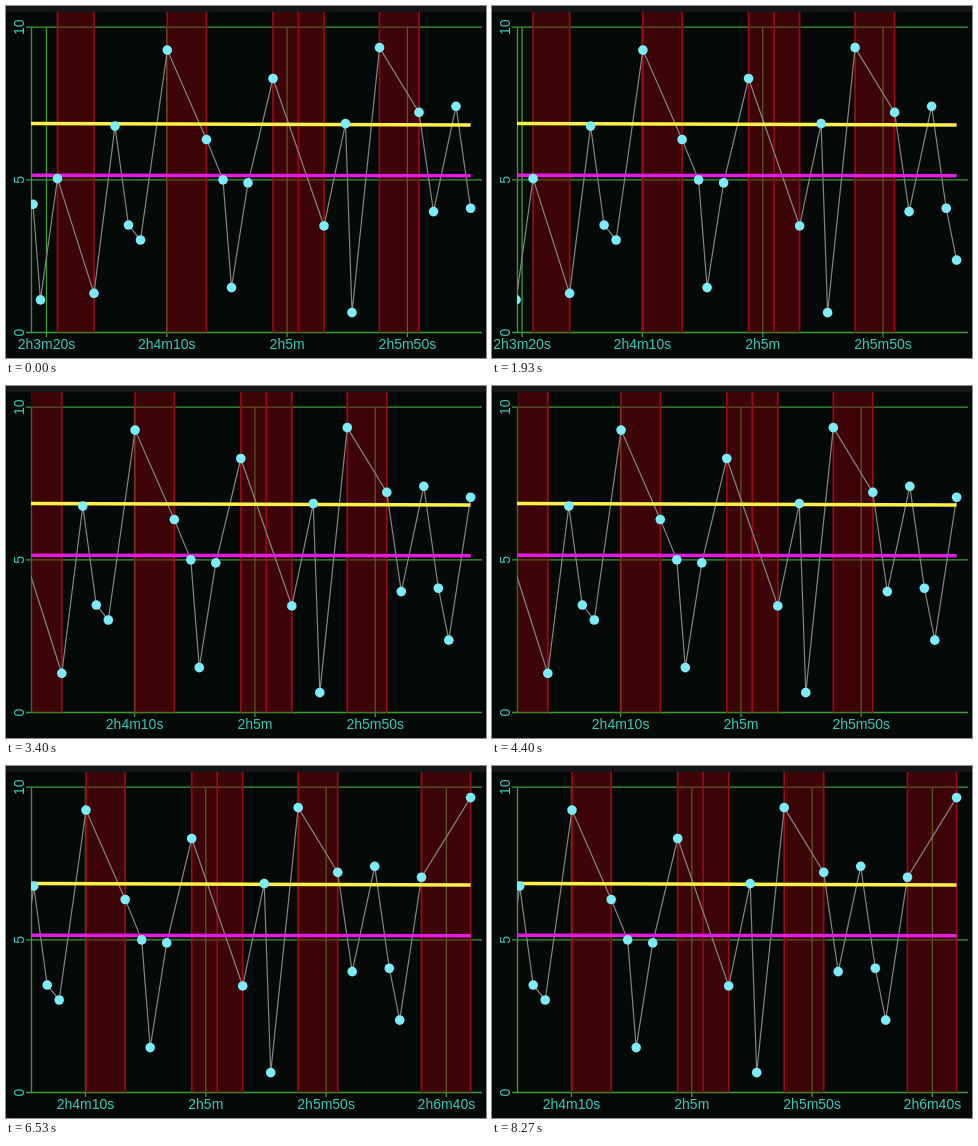
Animation, 480 px wide and 352 px high, one loop 8340 ms. Source, as an HTML page with a canvas:

```html
<!DOCTYPE html>
<html lang="en">
<head>
<meta charset="utf-8">
<title>Streaming plot</title>
<style>
html, body { margin: 0; width: 480px; height: 352px; overflow: hidden; background: #050a08; }
canvas { display: block; }
</style>
</head>
<body>
<canvas id="plot" width="480" height="352"></canvas>
<script>
const ctx = document.getElementById('plot').getContext('2d');
const LOOP = 8340, LEFT = 25, RIGHT = 464.6, TOP = 6, BASE = 326.5, UNIT = 30.53;
const TICK_GAP = 120.3, TICK_SECONDS = 50, FIRST_TICK = 7400;
const GRID = '#3c9c3a';

// Measured samples: position along the time axis, value from 0 to 10
const samples = [
  [27, 4.2], [34.5, 1.07], [51.5, 5.04], [88, 1.28], [109, 6.76], [122.5, 3.52],
  [134.5, 3.03], [161.3, 9.25], [200.5, 6.32], [217, 5], [225.5, 1.47], [242, 4.9],
  [267, 8.32], [318, 3.49], [339.5, 6.84], [346, .65], [373.5, 9.33], [413, 7.21],
  [427.5, 3.96], [450, 7.41], [464.6, 4.07], [475, 2.37], [496.8, 7.05], [545.9, 9.66]
];

const yOf = value => BASE - value * UNIT;
const arrival = x => 600 + (x - 475) * 83.6;

function line(color, width, ...pts) {
  ctx.strokeStyle = color;
  ctx.lineWidth = width;
  ctx.beginPath();
  pts.forEach(([x, y]) => ctx.lineTo(x, y));
  ctx.stroke();
}

function timeLabel(seconds) {
  const h = Math.floor(seconds / 3600), m = Math.floor(seconds / 60) % 60, s = seconds % 60;
  return `${h}h${m}m${s ? s + 's' : ''}`;
}

function drawGrid(shift) {
  ctx.fillStyle = '#36cbb8';
  ctx.font = '14px "Liberation Sans", Arial, sans-serif';
  ctx.textAlign = 'center';
  for (let i = 0; i < 5; i++) {
    const x = 40.5 + TICK_GAP * i - shift;
    if (x < LEFT || x > 476) continue;
    line(GRID, 1.3, [x, yOf(10)], [x, 331]);
    ctx.fillText(timeLabel(FIRST_TICK + TICK_SECONDS * i), x, 343);
  }
  for (let value = 0; value <= 10; value += 5) {
    const y = yOf(value);
    line(GRID, 1.3, [20, y], [476, y]);
    ctx.save();
    ctx.translate(18, y);
    ctx.rotate(-Math.PI / 2);
    ctx.fillText(value, 0, 0);
    ctx.restore();
  }
  line(GRID, 1.3, [25.5, yOf(10)], [25.5, BASE]);
}

// Long gaps between samples are marked red, very long ones also in the middle
function drawGaps(pts) {
  pts.slice(1).forEach(([end], i) => {
    const start = pts[i][0], gap = end - start;
    if (gap < 30) return;
    ctx.fillStyle = 'rgba(130, 0, 10, .46)';
    ctx.fillRect(start, TOP, gap, BASE - TOP);
    const edges = gap > 50 ? [start, start + gap / 2, end] : [start, end];
    for (const x of edges) line('#980a16', 1.7, [x, TOP], [x, BASE]);
  });
}

function drawData(pts) {
  line('#85857f', 1.2, ...pts);
  line('#fff04a', 3.6, [LEFT, 117.5], [RIGHT, 119]);
  line('#e31be0', 3.6, [LEFT, 169.3], [RIGHT, 169.8]);
  ctx.fillStyle = '#7cebfa';
  for (const [x, y] of pts) {
    ctx.beginPath();
    ctx.arc(x, y, 4.8, 0, 2 * Math.PI);
    ctx.fill();
  }
}

function draw(time) {
  const seen = samples.filter(([x]) => arrival(x) <= time);
  const shift = seen[seen.length - 1][0] - RIGHT;
  const pts = seen.map(([x, value]) => [x - shift, yOf(value)]);
  ctx.fillStyle = '#050a08';
  ctx.fillRect(0, 0, 480, 352);
  ctx.fillStyle = '#151617';
  ctx.fillRect(0, 0, 480, TOP);
  drawGrid(shift);
  ctx.save();
  ctx.beginPath();
  ctx.rect(LEFT, 0, 480 - LEFT, 352);
  ctx.clip();
  drawGaps(pts);
  drawData(pts);
  ctx.restore();
}

const start = performance.now();
function tick() {
  draw((performance.now() - start) % LOOP);
  requestAnimationFrame(tick);
}
tick();
</script>
</body>
</html>
```
